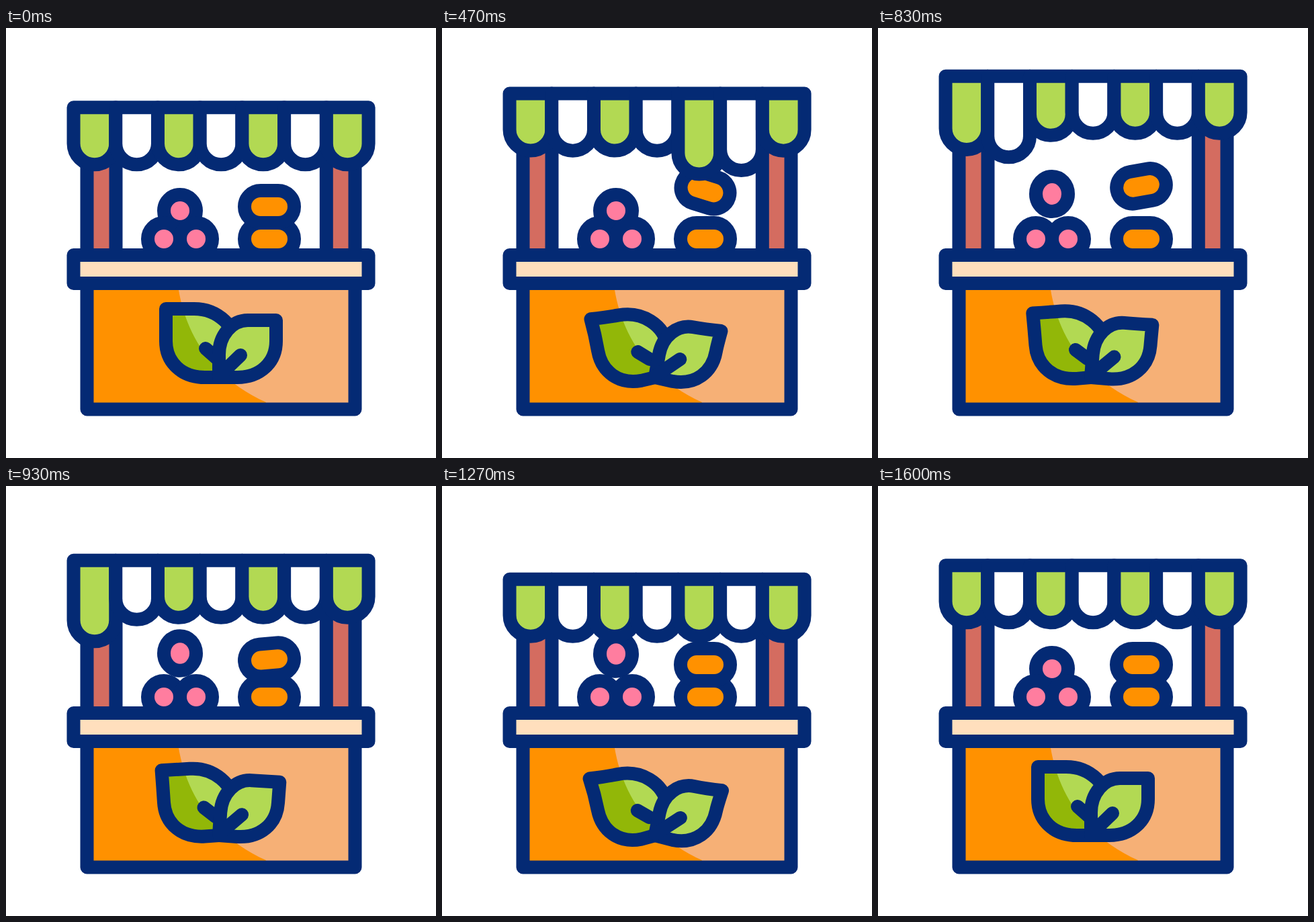
Recreate the animation shown at these times as an HTML page. Size 640 px wide and 640 px high, loop 2 s.

```html
<!DOCTYPE html>
<html lang="en">
<head>
<meta charset="utf-8">
<title>Market stall</title>
<style>
  html, body { margin: 0; width: 100%; height: 100%; overflow: hidden; background: #fff; }
  svg { display: block; width: 100vw; height: 100vh; }
  .ink { stroke: #042a74; stroke-width: 20; stroke-linejoin: round; stroke-linecap: round; }
  .none { fill: none; }
  .pink { fill: #ff7d9f; }
  .orange { fill: #ff9100; }
  .lime { fill: #b2d953; }
  .olive { fill: #92b708; }
  .white { fill: #fff; }
  .post { fill: #d46c60; }
  .cream { fill: #ffdfbd; }
  .peach { fill: #f6b076; }
</style>
</head>
<body>
<svg viewBox="0 0 640 640">
  <clipPath id="shade"><path d="M0 390H257C268 455 305 520 387 557V640H0Z"/></clipPath>

  <rect class="ink post" x="120.5" width="43"/>
  <rect class="ink post" x="476.8" width="42.7"/>

  <ellipse id="ball" class="ink pink" cx="259" rx="24"/>
  <circle class="ink pink" cx="235" cy="314" r="24"/>
  <circle class="ink pink" cx="283" cy="314" r="24"/>
  <rect class="ink orange" x="355" y="290" width="74" height="48" rx="24"/>
  <rect id="bread" class="ink orange" x="-37" y="-24" width="74" height="48" rx="24"/>

  <g id="roof"></g>

  <path class="peach" d="M120 380H520V567H120Z"/>
  <path class="orange" d="M120 380H520V567H120Z" clip-path="url(#shade)"/>
  <path class="ink none" d="M120.5 380H519.5V567.5H120.5Z"/>
  <path class="ink cream" d="M100.5 338H539.5V380H100.5Z"/>

  <path class="lime left leaf"/>
  <g clip-path="url(#shade)"><path class="olive left leaf"/></g>
  <path class="ink none left leaf"/>
  <path class="ink none left vein"/>
  <path class="ink lime right leaf"/>
  <path class="ink none right vein"/>
</svg>
<script>
const LOOP = 2000, FPS = 30;
const FLAPS = 7, HALF = 31.36, FIRST = 131.9, LAG = 3;

const sine = s => (1 - Math.cos(Math.PI * s)) / 2;
const cubic = s => s < .5 ? 4 * s ** 3 : 1 - 4 * (1 - s) ** 3;

// Each key is [frame, value, easing into it]
function track(keys, f) {
  if (f <= keys[0][0]) return keys[0][1];
  for (let i = 1; i < keys.length; i++) {
    const [f0, v0] = keys[i - 1], [f1, v1, ease = sine] = keys[i];
    if (f < f1) return v0 + (v1 - v0) * ease((f - f0) / (f1 - f0));
  }
  return keys[keys.length - 1][1];
}

const roofY = [[10, 0], [20, -60], [34.5, 22, cubic], [48, 0, cubic]];
const flapDrop = [[4.9, 0], [8.3, 35.5], [10, 35.5], [13.7, 0]];
const breadY = [[9, 0], [20, -57], [30.5, 0]];
const breadTurn = [[8, 0], [18.5, 28], [25, -10], [31, 0]];
const ballLift = [[19, 0], [25, 25], [31, 21], [38, 22], [47, 0]];
const leafDroop = [[9, 0], [19, 1], [26.5, .14], [34.5, .67], [48, 0]];

function set(selector, attrs) {
  for (const el of document.querySelectorAll(selector))
    for (const name in attrs) el.setAttribute(name, attrs[name]);
}

const roof = document.getElementById('roof');
const flaps = Array.from({ length: FLAPS }, (_, i) => {
  const el = document.createElementNS('http://www.w3.org/2000/svg', 'path');
  el.setAttribute('class', 'ink ' + (i % 2 ? 'white' : 'lime'));
  return roof.appendChild(el);
});

// A leaf grown from its base at 0,0 to a tip at -w,-h; curl pinches its shoulders
function leaf(w, h, back, curl) {
  const top = 6 * curl - h, side = 9 * curl - w, sag = 5 * curl;
  return `M${-w} ${-h}Q${24 - w} ${top} ${42 - w} ${top}
    C${back - .45 * (back + w - 42)} ${top} ${back} ${-.74 * h} ${back} ${-.4 * h}
    L0 0L${58 - w} ${sag}C${24 - w} ${sag} ${side} -22 ${side} -54
    Q${side} ${24 - h} ${-w} ${-h}Z`;
}

function draw(f) {
  const y = track(roofY, f);
  set('#roof', { transform: `translate(0 ${y})` });
  set('.post', { y: 160 + y, height: 178 - y });

  // The wave runs from the right end to the left
  flaps.forEach((el, i) => {
    const x = FIRST + i * 2 * HALF;
    const low = 172 + track(flapDrop, f - LAG * (FLAPS - 1 - i));
    el.setAttribute('d',
      `M${x - HALF} 118.3H${x + HALF}V${low}A${HALF} ${HALF} 0 0 1 ${x - HALF} ${low}Z`);
  });

  set('#bread', {
    transform: `translate(392 ${266 + track(breadY, f)}) rotate(${track(breadTurn, f)})`
  });
  const lift = track(ballLift, f);
  set('#ball', { cy: 272 - lift, ry: 24 + .08 * lift });

  const droop = track(leafDroop, f), curl = droop ** 2;
  const turn = `rotate(${-20 * droop})`;
  set('.left', { transform: `translate(317 520) ${turn}` });
  set('.right', { transform: `translate(317 520) scale(-1 1) ${turn}` });
  set('.left.leaf', { d: leaf(79, 102, 27, curl) });
  set('.right.leaf', { d: leaf(85, 85, 0, curl) });
  set('.left.vein', { d: `M${5 * curl - 20} ${5 * curl - 43}L-3 -28` });
  set('.right.vein', { d: 'M-32 -33L0 -2' });
}

// The motion steps at 30 per second
function tick() {
  draw(Math.floor(performance.now() % LOOP * FPS / 1000 + .101));
  requestAnimationFrame(tick);
}
tick();
</script>
</body>
</html>
```
